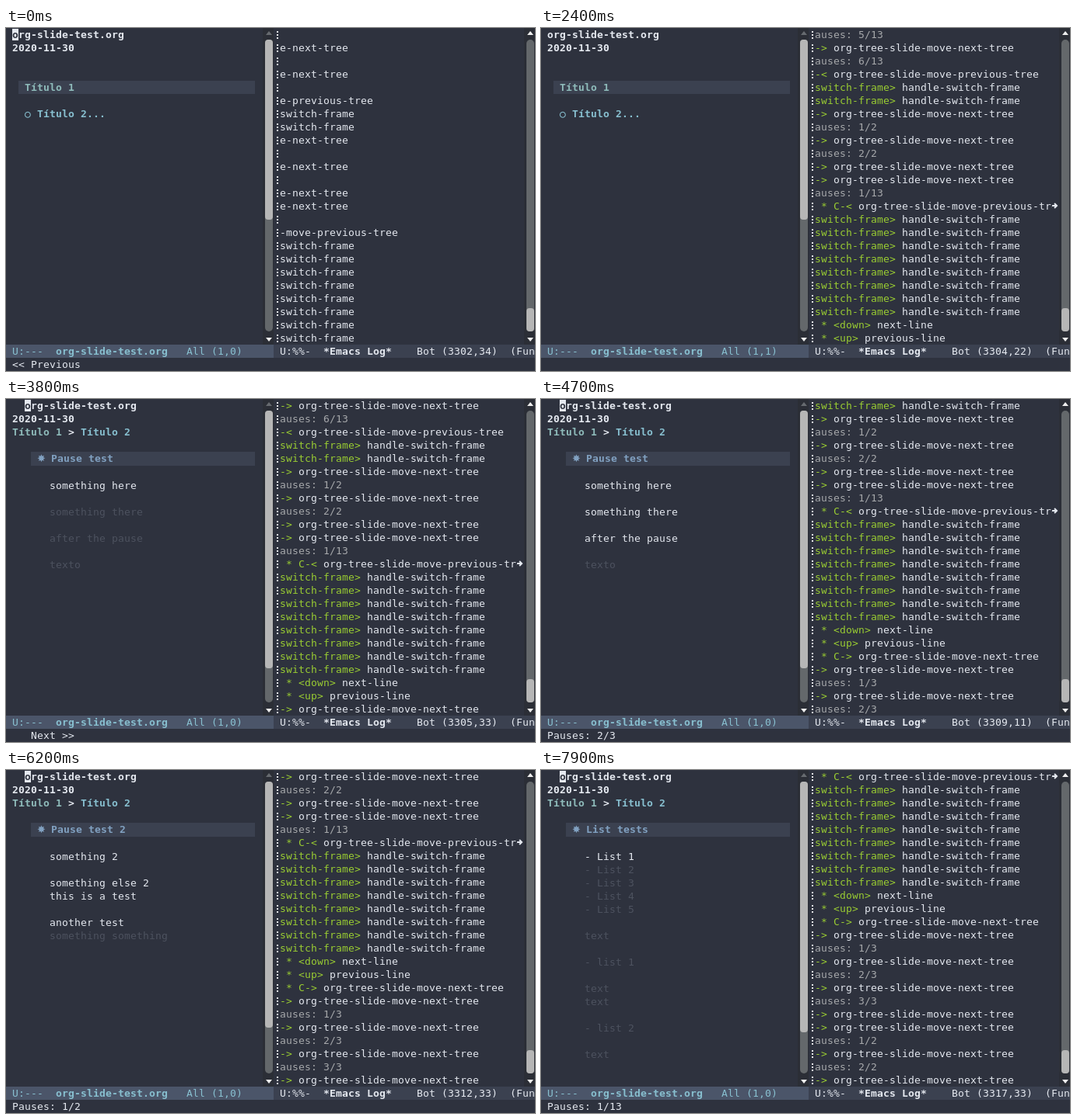
Write an HTML page that moves like this. It is 680x442 px and loops after 8000 ms.

```html
<!DOCTYPE html>
<html lang="en">
<head>
<meta charset="utf-8">
<title>Slides with a command log</title>
<style>
html, body { margin: 0; width: 100%; height: 100%; overflow: hidden; background: #2e323e; }
#stage {
  position: relative; width: 680px; height: 442px; overflow: hidden;
  background: #2e323e; color: #e5e9f0;
  font: 13px/17px "DejaVu Sans Mono", monospace;
  letter-spacing: calc(8px - 1ch); /* 8px character grid */
  font-variant-ligatures: none;
}
#stage div { position: absolute; white-space: pre; }
#left, #right { top: 0; height: 408px; overflow: hidden; }
#left { left: 0; width: 330px; }
#right { left: 344px; width: 323px; }
.row { height: 17px; }
.log { left: 8px; width: 305px; overflow: hidden; }
.bar { top: 408px; height: 17px; overflow: hidden; }
#barL { left: 0; width: 344px; background: #4b5569; color: #88c0d0; text-indent: 8px; }
#barR { left: 344px; width: 336px; background: #3b4150; text-indent: 8px; }
#echo { top: 425px; left: 8px; }
.hl { background: #3b4150; }
.cur { background: #e5e9f0; color: #2e323e; }
b { font-weight: bold; }
.teal { color: #8fbcbb; }
.cyan { color: #88c0d0; }
.blue { color: #81a1c1; }
.star { color: #81a1c1; font-family: "DejaVu Sans", sans-serif; letter-spacing: 0; }
.key { color: #9acd32; }
.msg { color: #a6a8ab; }
.dim { color: #4d525f; }
.cmt { color: #5d677b; }
.strip { top: 0; width: 14px; height: 408px; background: #2b2e36; }
.track { left: 3px; top: 15px; width: 10px; height: 376px; border-radius: 5px; background: #64686b; }
.thumb { left: 3px; width: 10px; border-radius: 4px; background: #b6b6b6; }
.strip svg { position: absolute; left: 0; top: 0; }
.dots { left: 4px; top: 4px; width: 2px; height: 2px; background: #e5e9f0; box-shadow: 0 4px #e5e9f0, 0 8px #e5e9f0; }
.more { position: absolute; left: 313px; }
</style>
</head>
<body>
<div id="stage">
  <div id="left"></div>
  <div id="right"></div>
  <div class="strip" style="left:330px">
    <div class="track"></div><div class="thumb" id="thumb" style="top:15px"></div>
    <svg width="14" height="408"><path d="M4 9h8l-4-5z" fill="#676b70"/><path d="M4 399h8l-4 5z" fill="#eee"/></svg>
  </div>
  <div class="strip" style="left:666px">
    <div class="track"></div><div class="thumb" style="top:361px;height:30px"></div>
    <svg width="14" height="408"><path d="M4 9h8l-4-5z" fill="#eee"/><path d="M4 399h8l-4 5z" fill="#eee"/></svg>
  </div>
  <div class="bar" id="barL"></div>
  <div class="bar" id="barR"></div>
  <div id="echo"></div>
</div>
<script>
const LOOP = 8000, ROWS = 24, SCROLL = 21, SLIDE_IN = 500;
const $ = id => document.getElementById(id);
const esc = s => s.replace(/&/g, '&amp;').replace(/</g, '&lt;').replace(/>/g, '&gt;');
const span = (cls, s) => `<span class="${cls}">${esc(s)}</span>`;
const bold = (cls, s) => `<b class="${cls}">${esc(s)}</b>`;
const at = (x, row, html, dy = 0) =>
  `<div class="row" style="left:${x}px;top:${row * 17 + dy}px">${html}</div>`;
const highlight = (x, row, end, height = 17) =>
  `<div class="hl" style="left:${x}px;top:${row * 17}px;width:${end - x}px;height:${height}px"></div>`;
const latest = (list, t) => list.filter(e => e[0] <= t).pop();

// Log entries: [key, command], or a plain message
const move = 'org-tree-slide-move-';
const next = ['->', move + 'next-tree'];
const frame = ['switch-frame>', 'handle-switch-frame'];
const pause = s => 'auses: ' + s;
const log = [
  pause('4/13'), next, pause('5/13'), next, pause('6/13'),
  ['-<', move + 'previous-tree'], frame, frame,
  next, pause('1/2'), next, pause('2/2'), next, next, pause('1/13'),
  [' * C-<', move + 'previous-tree'], ...Array(8).fill(frame),
  [' * <down>', 'next-line'], [' * <up>', 'previous-line'], [' * C->', next[1]],
  next, pause('1/3'), next, pause('2/3'), next, pause('3/3'),
  next, next, pause('1/2'), next, pause('2/2'), next
];
// [time, entries added since the start, point column]
const logSteps = [
  [0, 0, 34], [1000, 1, 20], [2000, 2, 22], [3700, 3, 33],
  [4300, 5, 11], [4700, 7, 11], [5100, 9, 11], [6000, 10, 33],
  [6400, 12, 11], [6900, 14, 11], [7700, 15, 33]
];

// Body lines: [text, pause that reveals it]; a leading # marks a directive
const slides = [
  { title: 'Pause test', thumb: 332, pauses: 3, body: [
    ['something here', 0], [''], ['#+pause:'], ['something there', 1], [''],
    ['#+pause:'], ['after the pause', 2], [''], ['#+pause:'], ['texto', 3]] },
  { title: 'Pause test 2', thumb: 317, pauses: 2, body: [
    ['something 2', 0], [''], ['#+pause:'], ['something else 2', 1],
    ['this is a test', 1], [''], ['another test', 1], ['#+beamer: \\pause'],
    ['#'], ['# pause'], ['something something', 2]] },
  { title: 'List tests', thumb: 323, pauses: 13, body:
    ['- List 1', '- List 2', '- List 3', '- List 4', '- List 5', '', 'text', '',
      '- list 1', '', 'text', 'text', '', '- list 2', '', 'text'].map((s, i) => [s, i + 1]) }
];
// [time, slide, pause]
const slideSteps = [
  [3200, 0, 0], [4100, 0, 1], [4500, 0, 2], [4900, 0, 3],
  [5400, 1, 0], [6200, 1, 1], [6700, 1, 2],
  [7100, 2, 0], [7900, 2, 1]
];

function logRow(entry, row, shift, isLast) {
  let html, more = '';
  if (typeof entry === 'string') {
    html = shift ? '' : span('msg', entry);
  } else {
    let [key, cmd] = entry;
    if (isLast && key === ' * C->') key = '->';
    const full = key + ' ' + cmd;
    html = shift ? esc(full.slice(shift)) : span('key', key) + ' ' + esc(cmd);
    if (full.length - shift > 38) more =
      '<svg class="more" width="8" height="17"><path d="M0 8h6M3 5l3 3-3 3" fill="none" stroke="#e5e9f0" stroke-width="2"/></svg>';
  }
  return `<div class="row" style="left:0;top:${row * 17}px;width:323px"><div class="dots"></div><div class="row log">${html}</div>${more}</div>`;
}

function drawLog(t) {
  const [, added, col] = latest(logSteps, t);
  $('right').innerHTML = log.slice(added, added + ROWS).map((e, i) =>
    logRow(e, i, added ? 0 : SCROLL, i === ROWS - 1)).join('');
  $('barR').innerHTML = `U:%%-  <b>*Emacs Log*</b>    Bot (${3302 + added},${col})  (Fun`;
}

function drawTitle(x, cursor) {
  return at(x, 0, `<b>${cursor ? '<span class="cur">o</span>' : 'o'}rg-slide-test.org</b>`) +
    at(8, 1, '<b>2020-11-30</b>');
}

function status(where, pos) {
  $('barL').innerHTML = `U:---  <b>org-slide-test.org</b>   ${where} (${pos})`;
}

function drawOutline(t) {
  const down = t >= 700 && t < 1700, start = t < 700;
  $('left').innerHTML = drawTitle(8, start) +
    (down ? highlight(16, 6, 128) + at(16, 6, '<span class="cur">*</span>') : highlight(16, 4, 320)) +
    at(24, 4, bold('teal', 'Título 1')) +
    at(24, 6, bold('cyan', '○')) + at(40, 6, bold('cyan', 'Título 2...'));
  $('thumb').style.height = '232px';
  $('echo').textContent = start ? '<< Previous' : '';
  status('All', start ? '1,0' : down ? '3,0' : '1,1');
}

function drawSlide(t) {
  const [since, index, shown] = latest(slideSteps, t);
  const { title, thumb, pauses, body } = slides[index];
  const moving = !shown && t - since < SLIDE_IN;
  const top = 4 + (moving ? 10 - 2 * Math.floor((t - since) / 100) : 0);
  const lines = moving ? body : body.filter(([s]) => s[0] !== '#');
  // The star makes the heading row one pixel taller
  $('left').innerHTML = drawTitle(24, true) +
    at(8, 2, bold('teal', 'Título 1') + '<b> &gt; </b>' + bold('cyan', 'Título 2')) +
    (moving ? '' : highlight(32, top, 320, 18)) +
    at(40, top, span('star', '✸')) + at(58, top, bold('blue', title)) +
    lines.map(([s, n], i) => {
      const cls = s[0] === '#' ? 'cmt' : !moving && n > shown ? 'dim' : '';
      return at(56, top + 2 + i, span(cls, s === '#' ? '' : s), 1);
    }).join('');
  $('thumb').style.height = thumb + 'px';
  $('echo').textContent = shown ? `Pauses: ${shown}/${pauses}` : '   Next >>';
  status(moving ? 'Top' : 'All', '1,0');
}

let last = -1;
function tick() {
  const t = Math.floor(performance.now() % LOOP / 100) * 100;
  if (t !== last) {
    last = t;
    drawLog(t);
    (t < slideSteps[0][0] ? drawOutline : drawSlide)(t);
  }
  requestAnimationFrame(tick);
}
tick();
</script>
</body>
</html>
```
